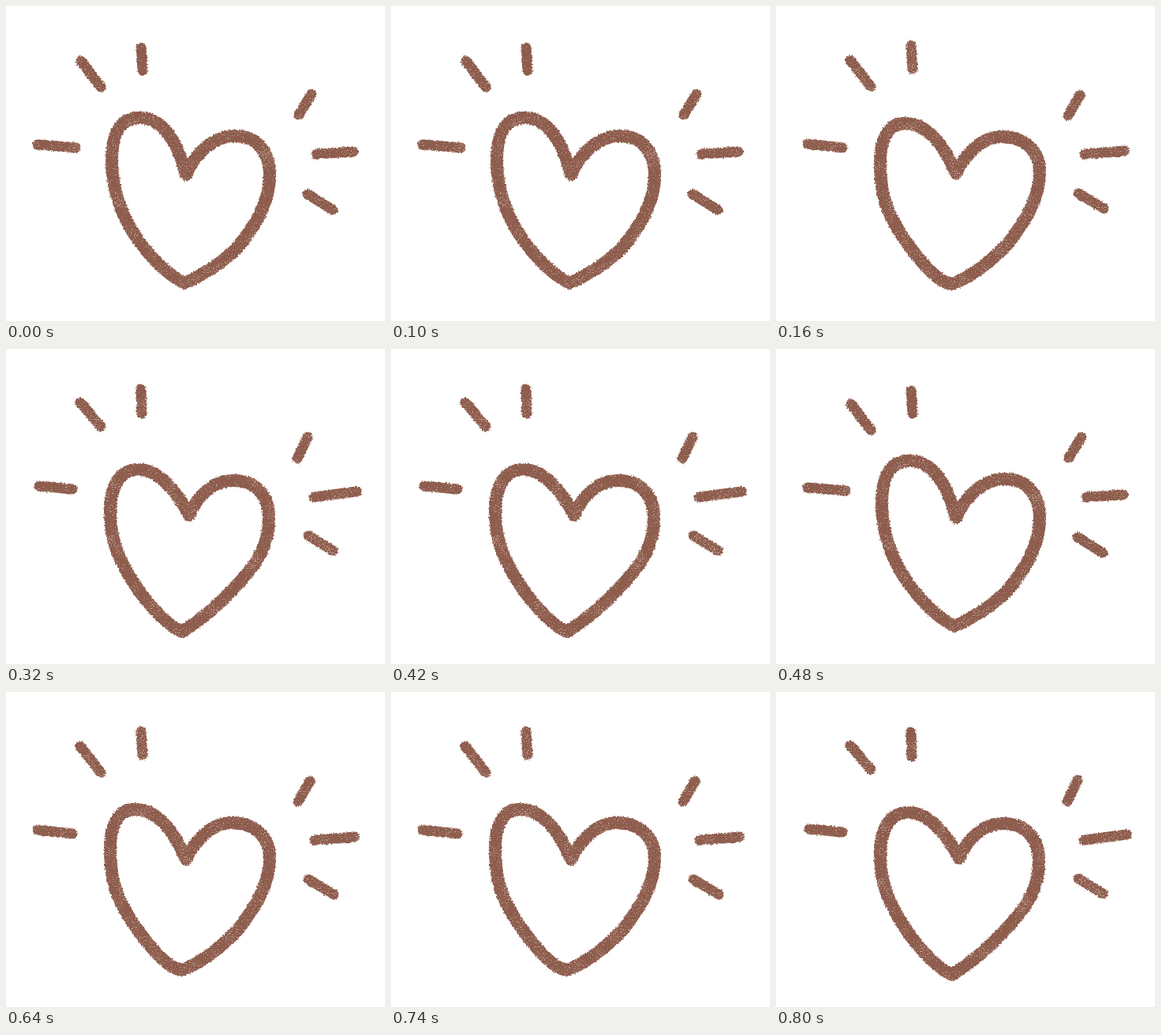
An HTML page for the animation above (0.96 s loop, 480 by 400 pixels).

```html
<!DOCTYPE html>
<html lang="en">
<head>
<meta charset="utf-8">
<title>Shining heart</title>
<style>
  html, body { margin: 0; width: 100%; height: 100%; overflow: hidden; background: #fff; }
  svg { display: block; width: 480px; height: 400px; }
</style>
</head>
<body>
<svg id="stage" viewBox="0 0 480 400" fill="none" stroke="#8d5c4c" stroke-linecap="round" stroke-linejoin="round"></svg>
<script>
const HOLD = 160;
const stage = document.getElementById('stage');

// Each pose is a hand-drawn take: a heart outline and its six rays.
const poses = [
  {
    heart: `M228 214 C219 180 202 142 169 142 C142 142 134 167 134 195
      C134 229 144 259 160 286 C178 314 199 338 226 352
      C250 341 275 325 294 306 C315 280 334 250 334 215
      C334 185 318 165 290 165 C262 165 240 187 228 214Z`,
    rays: `M95 70L120 103 M171 53L173 82 M40 176L88 180
      M387 112L371 138 M393 188L440 185 M382 239L414 259`
  },
  {
    heart: `M228 212 C218 190 198 149 163 149 C139 149 132 174 132 200
      C132 226 136 248 146 268 C158 293 187 331 205 345 Q216 353 224 353
      C250 342 273 324 295 300 C316 272 334 245 334 210
      C334 184 315 166 285 166 C262 166 241 186 228 212Z`,
    rays: `M94 69L120 102 M171 50L173 80 M40 175L84 180
      M385 113L370 139 M391 188L441 184 M383 238L415 257`
  },
  {
    heart: `M232 211 C221 190 197 153 168 153 C141 153 132 179 132 207
      C132 231 137 252 147 271 C160 298 190 343 223 359
      C250 342 272 323 295 297 C317 273 333 250 333 215
      C333 185 316 167 288 167 C262 167 242 187 232 211Z`,
    rays: `M94 68L120 98 M171 51L172 82 M42 174L84 178
      M382 112L369 139 M390 188L444 181 M383 237L414 256`
  }
];

// Crayon look: ragged edges plus patchy pale grain.
const crayon = i => `
  <filter id="crayon${i}" filterUnits="userSpaceOnUse" x="0" y="0" width="480" height="400" color-interpolation-filters="sRGB">
    <feTurbulence type="fractalNoise" baseFrequency=".45" numOctaves="2" seed="${i + 3}" result="edge"/>
    <feDisplacementMap in="SourceGraphic" in2="edge" scale="4" xChannelSelector="R" yChannelSelector="G" result="rough"/>
    <feTurbulence type="fractalNoise" baseFrequency=".65" numOctaves="2" seed="${i + 11}" result="fine"/>
    <feTurbulence type="fractalNoise" baseFrequency=".05" numOctaves="2" seed="${i + 21}" result="patch"/>
    <feComposite in="fine" in2="patch" operator="arithmetic" k2=".75" k3=".25"/>
    <feColorMatrix values="0 0 0 0 .78  0 0 0 0 .66  0 0 0 0 .62  0 0 0 8 -4.6"/>
    <feComposite in2="rough" operator="in" result="grain"/>
    <feMerge><feMergeNode in="rough"/><feMergeNode in="grain"/></feMerge>
  </filter>`;

stage.innerHTML = poses.map((p, i) => `${crayon(i)}
  <g class="pose" filter="url(#crayon${i})">
    <path d="${p.heart}" stroke-width="16"/>
    <path d="${p.rays}" stroke-width="13"/>
  </g>`).join('');

const takes = [...stage.querySelectorAll('.pose')];

function draw(time) {
  const now = Math.floor(time / HOLD) % takes.length;
  takes.forEach((g, i) => g.setAttribute('display', i === now ? 'inline' : 'none'));
}

const start = performance.now();
function tick() {
  draw(performance.now() - start);
  requestAnimationFrame(tick);
}
tick();
</script>
</body>
</html>
```
